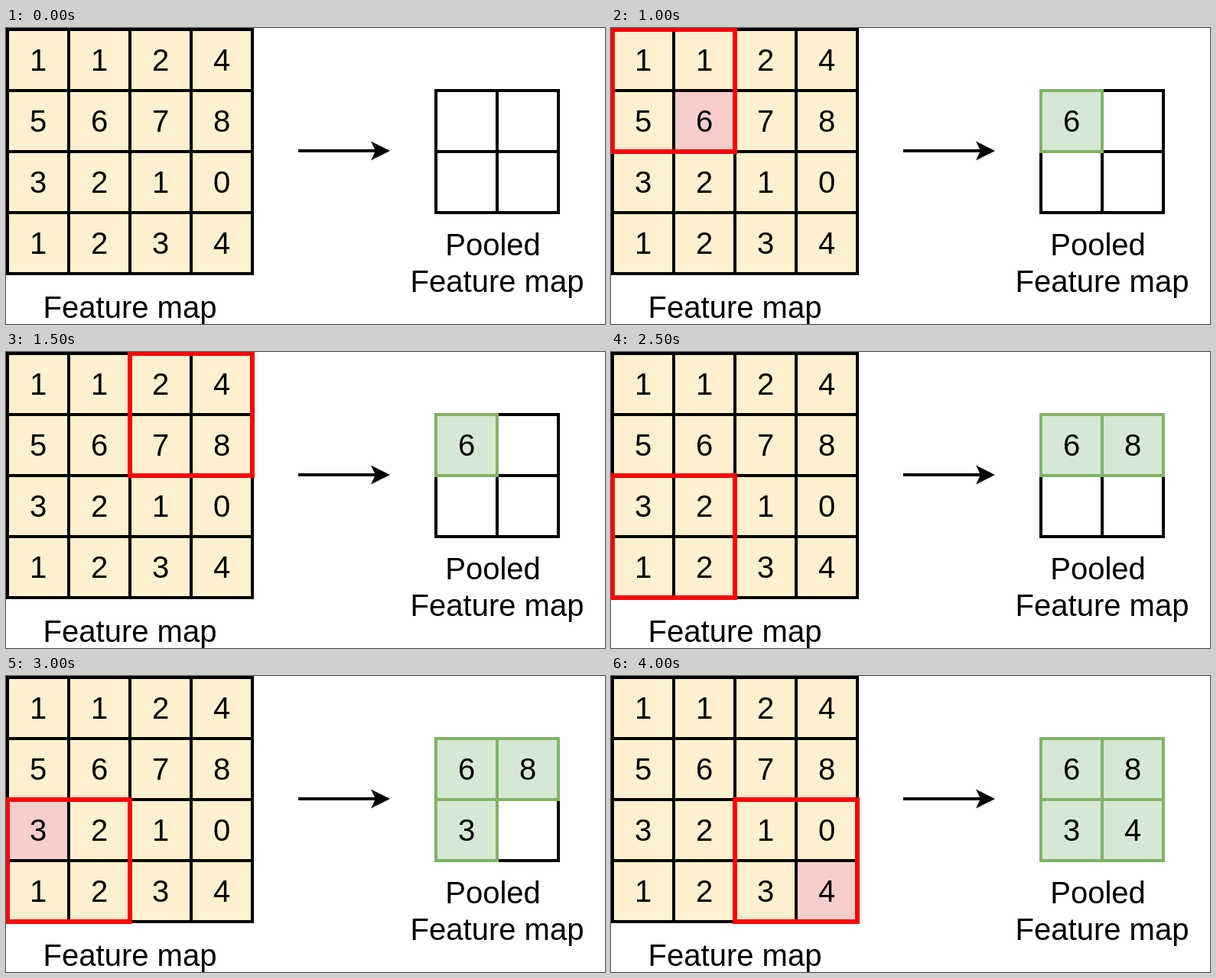
Animation, 783 px wide and 388 px high, one loop 4500 ms. Source, as an HTML page with a canvas:

```html
<!DOCTYPE html>
<html lang="en">
<head>
<meta charset="utf-8">
<title>Max pooling</title>
<style>
  html, body { margin: 0; width: 100%; height: 100%; overflow: hidden; background: #fff; }
  canvas { display: block; }
</style>
</head>
<body>
<canvas id="stage" width="783" height="388"></canvas>
<script>
const ctx = document.getElementById('stage').getContext('2d');
const CELL = 80, STEP_MS = 500, STEPS = 9;
const CREAM = '#fff0cf', PINK = '#f8cecc', GREEN = '#d5e8d4', GREEN_LINE = '#82b366';
const FEATURES = [
  [1, 1, 2, 4],
  [5, 6, 7, 8],
  [3, 2, 1, 0],
  [1, 2, 3, 4]
];
const MAP = { x: 2, y: 2 }, POOLED = { x: 562, y: 82 };

// Each 2x2 window with its largest value and that value's cell.
const windows = [0, 1, 2, 3].map(i => {
  const col = i % 2, row = Math.floor(i / 2);
  const cells = [0, 1, 2, 3].map(k => {
    const c = col * 2 + k % 2, r = row * 2 + Math.floor(k / 2);
    return { c, r, value: FEATURES[r][c] };
  });
  return { col, row, max: cells.reduce((a, b) => b.value > a.value ? b : a) };
});

function box(origin, col, row, size, fill, line, width) {
  const area = [origin.x + col * CELL, origin.y + row * CELL, size, size];
  if (fill) {
    ctx.fillStyle = fill;
    ctx.fillRect(...area);
  }
  ctx.strokeStyle = line;
  ctx.lineWidth = width;
  ctx.strokeRect(...area);
}

function label(text, x, baseline) {
  ctx.fillStyle = '#000';
  ctx.fillText(text, x, baseline);
}

function digit(origin, col, row, value) {
  label(value, origin.x + (col + 0.5) * CELL, origin.y + row * CELL + 54);
}

function arrow() {
  ctx.fillStyle = '#000';
  ctx.fillRect(382, 159, 104, 4);
  ctx.beginPath();
  ctx.moveTo(502, 161);
  ctx.lineTo(477, 173.5);
  ctx.lineTo(483, 161);
  ctx.lineTo(477, 148.5);
  ctx.fill();
}

function draw(step) {
  const active = windows[Math.ceil(step / 2) - 1];
  const pooledCount = Math.floor(step / 2);
  const maxShown = step > 0 && step % 2 === 0;

  ctx.fillStyle = '#fff';
  ctx.fillRect(0, 0, 783, 388);
  ctx.font = '40px "Liberation Sans", Helvetica, Arial, sans-serif';
  ctx.textAlign = 'center';

  FEATURES.forEach((values, r) => values.forEach((value, c) => {
    const marked = maxShown && active.max.c === c && active.max.r === r;
    box(MAP, c, r, CELL, marked ? PINK : CREAM, '#000', 4);
  }));
  FEATURES.forEach((values, r) => values.forEach((value, c) => digit(MAP, c, r, value)));
  if (active) box(MAP, active.col * 2, active.row * 2, CELL * 2, null, '#f00', 6);

  windows.forEach(w => box(POOLED, w.col, w.row, CELL, '#fff', '#000', 4));
  windows.slice(0, pooledCount).forEach(w => {
    box(POOLED, w.col, w.row, CELL, GREEN, GREEN_LINE, 4);
    digit(POOLED, w.col, w.row, w.max.value);
  });

  arrow();
  label('Feature map', 162, 380);
  label('Pooled', 636.5, 298);
  label('Feature map', 642, 346);
}

function tick() {
  draw(Math.floor(performance.now() / STEP_MS) % STEPS);
  requestAnimationFrame(tick);
}
tick();
</script>
</body>
</html>
```
